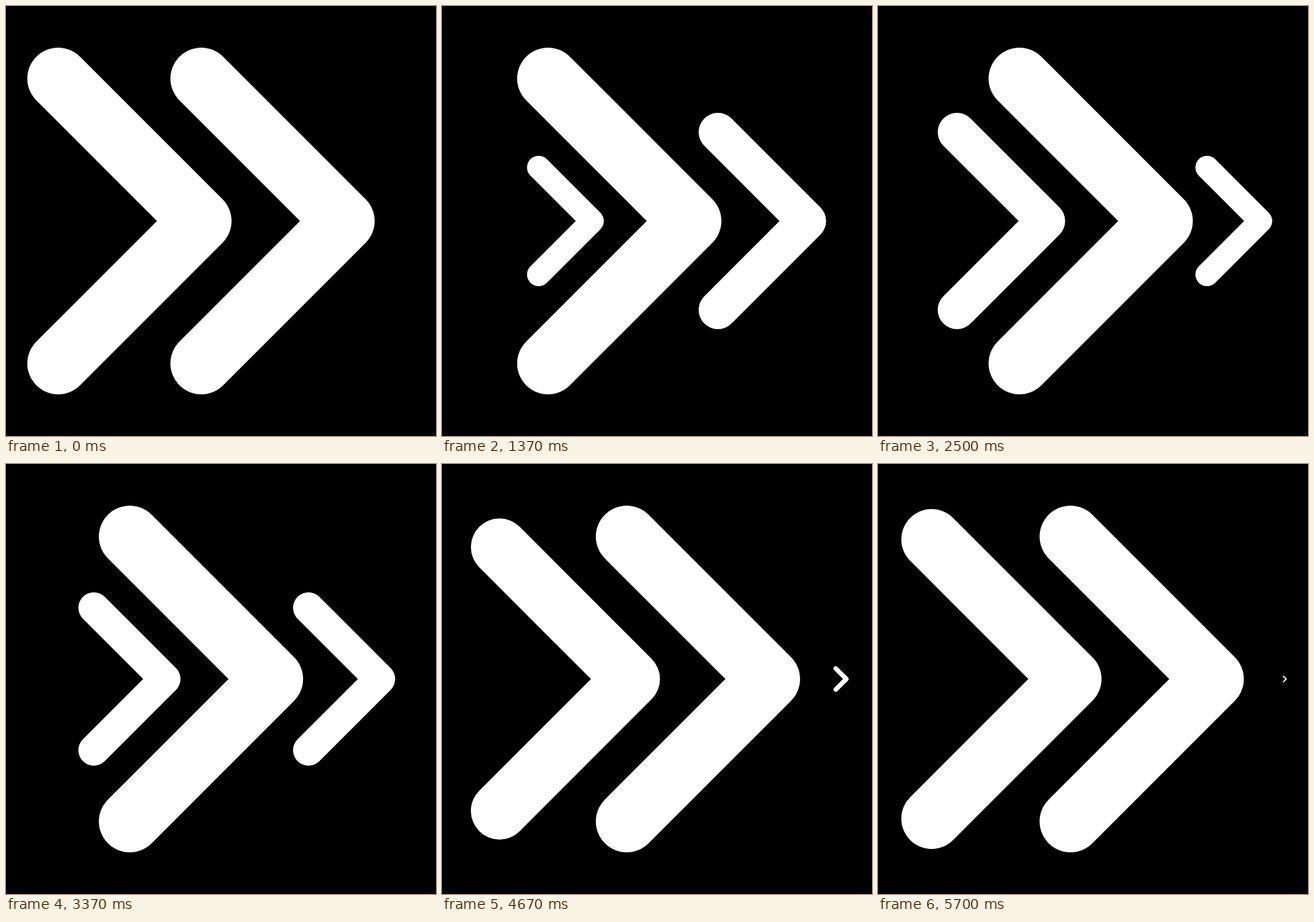
An HTML page for the animation above (5.73 s loop, 640 px wide and 640 px high).

```html
<!DOCTYPE html>
<html lang="en">
<head>
<meta charset="utf-8">
<title>Chevrons</title>
<style>
  html, body { margin: 0; width: 100%; height: 100%; overflow: hidden; background: #000; }
  svg { display: block; width: 100%; height: 100%; }
</style>
</head>
<body>
<svg viewBox="0 0 640 640">
  <defs>
    <path id="chevron" d="M-106-212L106 0L-106 212" fill="none" stroke="#fff"
          stroke-width="92" stroke-linecap="round" stroke-linejoin="round"/>
  </defs>
  <use class="arrow" href="#chevron"/>
  <use class="arrow" href="#chevron"/>
  <use class="arrow" href="#chevron"/>
</svg>
<script>
  const LOOP = 5730, TICK = 100 / 3, STEPS = 12;
  const START = 183.7, GAP = 213;
  const [enter, travel, leave] = document.querySelectorAll('.arrow');

  const ease = u => u * u * (3 - 2 * u);

  function place(arrow, slot, scale) {
    arrow.setAttribute('transform', `translate(${START + GAP * slot} 320) scale(${scale})`);
  }

  // Poses advance every 80 ms, shown on a 30 fps clock.
  function poseAt(ms) {
    const tick = Math.floor((ms % LOOP + 4) / TICK);
    return Math.floor(tick * 5 / 12) % STEPS;
  }

  function draw(ms) {
    const p = ease(poseAt(ms) / STEPS);
    place(enter, 0, p);
    place(travel, p, 1);
    place(leave, 1 + p, 1 - p);
  }

  const t0 = performance.now();
  function loop() {
    draw(performance.now() - t0);
    requestAnimationFrame(loop);
  }
  loop();
</script>
</body>
</html>
```
